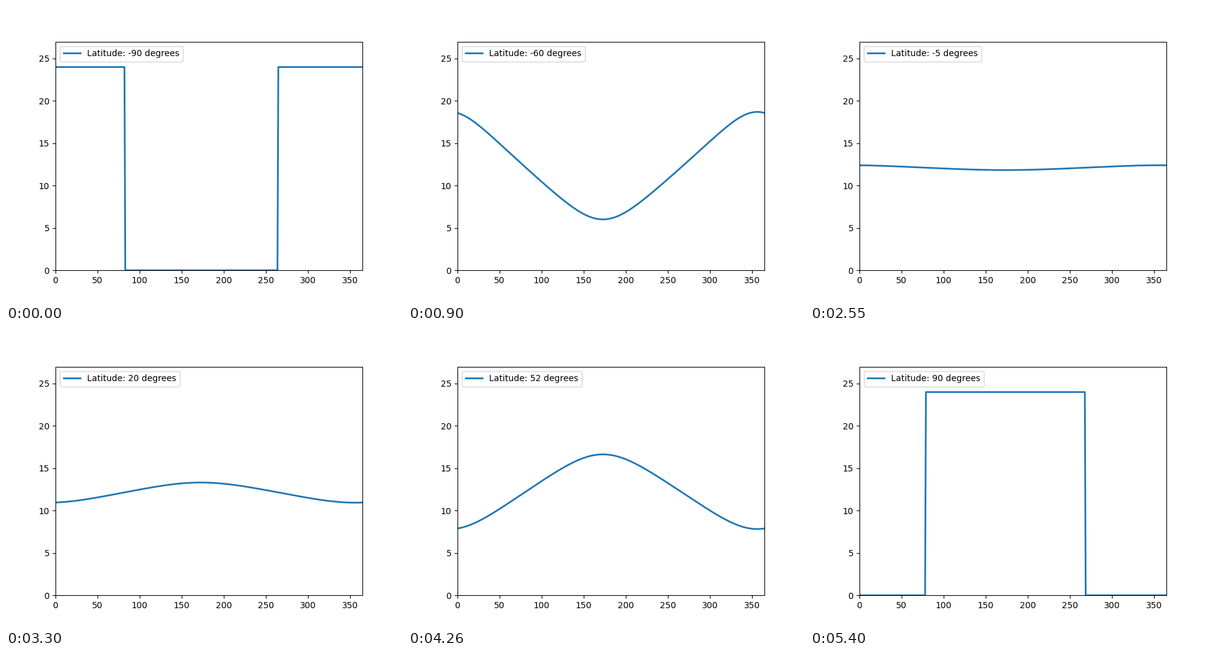
Recreate the animation shown at these times as a matplotlib script. Size 640x480 px, loop 5.43 s.

```python
import numpy as np
import matplotlib.pyplot as plt
from matplotlib.animation import FuncAnimation

MAX_SIN_DECL = 0.3918          # sine of the sun's largest declination
HORIZON = np.sin(np.radians(0.8333))
LATITUDES = np.arange(-90, 91)
days = np.arange(366)


def sin_declination(day):
    theta = 0.2163108 + 2 * np.arctan(0.9671396 * np.tan(0.0086 * (day - 186)))
    return MAX_SIN_DECL * np.cos(theta)


SIN_D = sin_declination(days)
COS_D = np.sqrt(1 - SIN_D ** 2)


def day_length(latitude):
    lat = np.radians(latitude)
    ratio = (HORIZON + np.sin(lat) * SIN_D) / (np.cos(lat) * COS_D)
    return 24 - 24 / np.pi * np.arccos(np.clip(ratio, -1, 1))


def caption(latitude):
    return f"Latitude: {latitude} degrees"


plt.rcParams["font.family"] = "DejaVu Sans"
fig, ax = plt.subplots(figsize=(6.4, 4.8), dpi=100)
ax.set_xlim(0, 365)
ax.set_ylim(0, 27)
line, = ax.plot(days, day_length(LATITUDES[0]), lw=2, color="#1f77b4",
                label=caption(LATITUDES[0]))
label = ax.legend(loc="upper left").get_texts()[0]


def update(i):
    latitude = LATITUDES[i]
    line.set_ydata(day_length(latitude))
    label.set_text(caption(latitude))
    return line, label


anim = FuncAnimation(fig, update, frames=len(LATITUDES), interval=30,
                     repeat=True, repeat_delay=0, blit=False)
plt.show()
```
